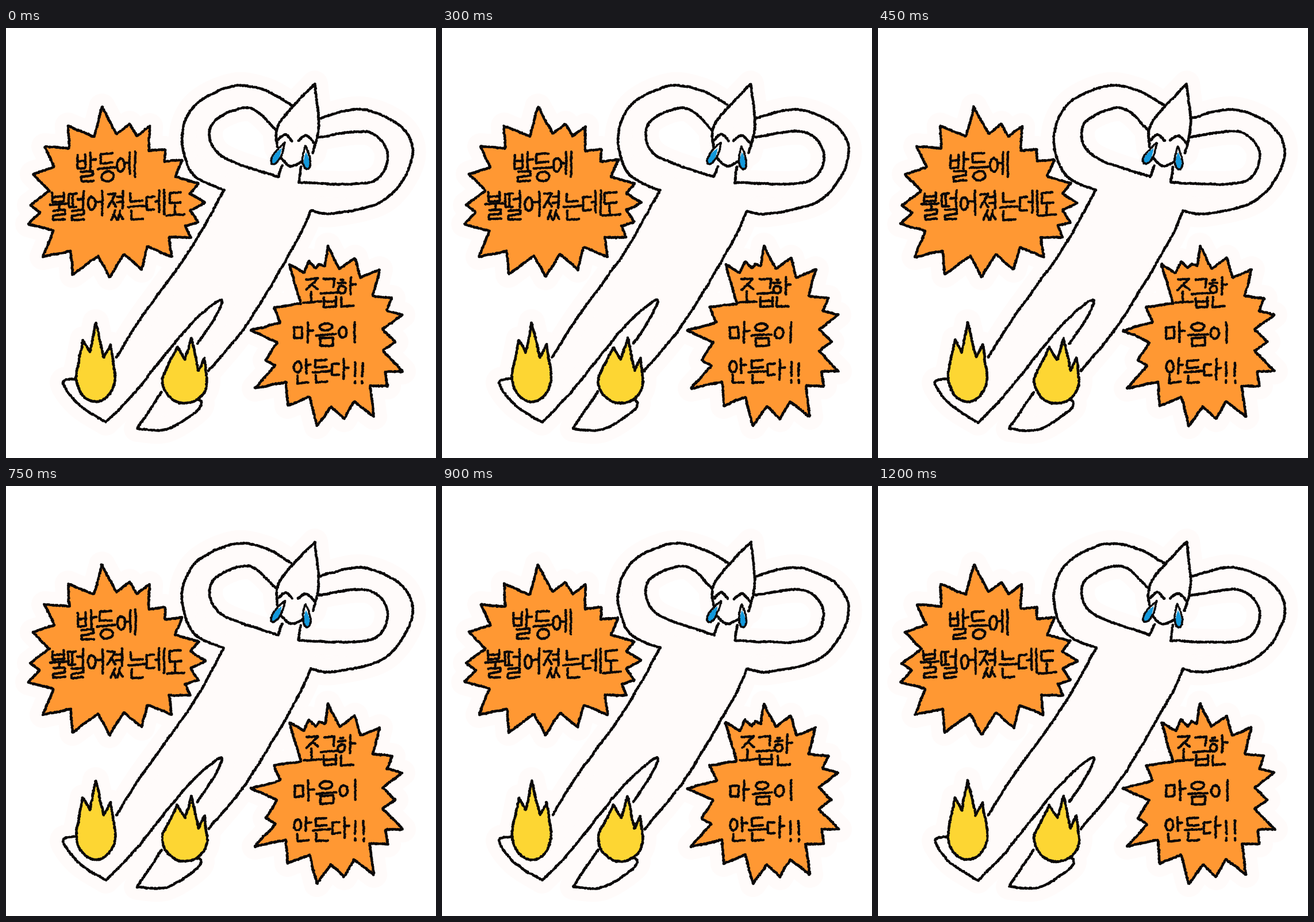
Write an HTML page with a canvas that moves like this. It is 748 px wide and 748 px high and loops after 1290 ms.

```html
<!DOCTYPE html>
<html lang="ko">
<head>
<meta charset="utf-8">
<style>
html, body { margin: 0; width: 100%; height: 100%; overflow: hidden; background: #fff; }
canvas { display: block; width: 748px; height: 748px; }
</style>
</head>
<body>
<canvas id="stage" width="748" height="748" role="img" aria-label="발등에 불 떨어졌는데도 조급한 마음이 안든다!!"></canvas>
<script>
const SIZE = 748, STEP = 150, LOOP = 1290, POSES = 9;
const INK = '#0b0909', HALO = '#fffbfa', ORANGE = '#ff9833', YELLOW = '#fdd633', BLUE = '#1399dc';

// Key points "x y x y" joined by splines; a bar marks a corner.
const figure = {
  armL: '497 134 452 109 395 101 330 133 306 190 325 254 379 282',
  sideL: '379 282 320 386 234 506 192 573',
  footL: '123 610 99 617 126 655 174 686 | 225 633 316 521 372 473 366 499 333 549',
  footR: '271 633 228 697 | 280 698 334 664 335 647 301 653',
  sideR: '530 319 503 376 421 512 352 597',
  armR: '545 157 620 142 690 174 706 230 660 298 570 323 530 318',
  loopL: '470 178 422 139 359 166 371 220 473 259 | 481 240',
  loopR: '544 190 630 181 664 220 634 268 509 269 | 513 242',
  head: '472 208 476 165 537 97 | 544 168 534 217',
  chin: '475 222 495 240 518 231',
  eyeL: '473 195 486 185 498 196',
  eyeR: '508 196 522 187 536 200'
};

// Only the spike tips; the notches between them follow from a rule.
const spikes = [
  '167 137 215 167 250 171 277 211 307 229 335 270 347 304 335 338 321 364 288 398 236 420 180 433 116 429 64 398 39 341 42 308 47 254 67 206 108 170',
  '560 379 607 400 650 420 672 470 689 499 677 546 690 597 664 623 640 676 588 680 541 692 490 657 433 627 452 578 426 526 466 486 493 411 527 406 545 410'
];

const rows = [
  { text: '발등에', x: 125, y: 217, pitch: 34, w: 32, h: 50 },
  { text: '불떨어졌는데도', x: 75, y: 285, pitch: 34, w: 31, h: 49 },
  { text: '조급한', x: 517, y: 435, pitch: 30, w: 31, h: 51 },
  { text: '마음이', x: 501, y: 513, pitch: 39, w: 34, h: 41 },
  { text: '안든다!!', x: 500, y: 577, pitch: 33, w: 30, h: 41 }
];

// Letter strokes as "xy" digits on a 0-9 grid; "o" is an oval below the given height.
const jamo = {
  ㄱ: '00 90 89', ㄴ: '00 09 99', ㄷ: '90 00 09 99', ㄸ: '40 00 09 49/90 50 59 99',
  ㄹ: '00 90 94 05 09 99', ㅁ: '00 90 99 09 00', ㅂ: '00 09 99 90/04 94', ㅇ: 'o0',
  ㅈ: '00 90 09/55 99', ㅆ: '30 09/24 49/70 59/74 99', ㅎ: '30 60/02 92/o4',
  ㅏ: '40 49/44 94', ㅓ: '04 64/60 69', ㅕ: '03 63/06 66/60 69', ㅔ: '04 44/40 48/90 99',
  ㅗ: '41 48/08 98', ㅜ: '01 91/51 59', ㅡ: '05 95', ㅣ: '60 69', '!': '50 56/58 59'
};
const FIRST = 'ㄱㄲㄴㄷㄸㄹㅁㅂㅃㅅㅆㅇㅈㅉㅊㅋㅌㅍㅎ';
const VOWEL = 'ㅏㅐㅑㅒㅓㅔㅕㅖㅗㅘㅙㅚㅛㅜㅝㅞㅟㅠㅡㅢㅣ';
const LAST = ' ㄱㄲㄳㄴㄵㄶㄷㄹㄺㄻㄼㄽㄾㄿㅀㅁㅂㅄㅅㅆㅇㅈㅊㅋㅌㅍㅎ';

function rng(seed) {
  let s = seed * 7919 + 13;
  return () => {
    s = (s + 0x6D2B79F5) | 0;
    let t = Math.imul(s ^ (s >>> 15), 1 | s);
    t = (t + Math.imul(t ^ (t >>> 7), 61 | t)) ^ t;
    return ((t ^ (t >>> 14)) >>> 0) / 4294967296;
  };
}

const mix = (a, b, t) => [a[0] + (b[0] - a[0]) * t, a[1] + (b[1] - a[1]) * t];
const gapOf = (a, b) => Math.hypot(b[0] - a[0], b[1] - a[1]);

function pairs(text) {
  const n = text.trim().split(/\s+/).map(Number), out = [];
  for (let i = 0; i < n.length; i += 2) out.push([n[i], n[i + 1]]);
  return out;
}

function spline(p) {
  const out = [p[0]];
  for (let i = 0; i < p.length - 1; i++) {
    const a = p[i - 1] || p[i], b = p[i], c = p[i + 1], d = p[i + 2] || c;
    for (let k = 1; k <= 16; k++) {
      const t = k / 16;
      out.push([0, 1].map(j => 0.5 * (2 * b[j] + (c[j] - a[j]) * t +
        (2 * a[j] - 5 * b[j] + 4 * c[j] - d[j]) * t * t +
        (3 * b[j] - a[j] - 3 * c[j] + d[j]) * t * t * t)));
    }
  }
  return out;
}

function curve(text) {
  let out = [];
  for (const part of text.split('|')) {
    const p = pairs(part);
    if (out.length) p.unshift(out[out.length - 1]);
    out = out.concat(spline(p));
  }
  return out;
}

function arc(cx, cy, rx, ry, from, to) {
  return Array.from({ length: 33 }, (_, i) => {
    const a = from + (to - from) * i / 32;
    return [cx + rx * Math.cos(a), cy + ry * Math.sin(a)];
  });
}

// The wider the gap between two tips, the deeper the notch.
function burst(text) {
  const tips = pairs(text), out = [];
  const centre = [0, 1].map(j => tips.reduce((s, p) => s + p[j], 0) / tips.length);
  tips.forEach((a, i) => {
    const b = tips[(i + 1) % tips.length], mid = mix(a, b, 0.5);
    out.push(a, mix(mid, centre, 0.57 * gapOf(a, b) / gapOf(mid, centre)));
  });
  return [...out, tips[0]];
}

// A round belly topped by three tongues.
function flame(cx, cy, rx, ry, tips) {
  const [a, b, c] = pairs(tips);
  const notch = (p, q) => [(p[0] + q[0]) / 2 + 1, Math.max(p[1], q[1]) + 22];
  const belly = arc(cx, cy, rx, ry, -0.2, Math.PI + 0.2);
  return [c, ...belly, ...spline([belly[32], mix(belly[32], a, 0.55), a]),
    notch(a, b), ...spline([notch(a, b), mix(notch(a, b), b, 0.5), b]),
    ...spline([b, mix(b, notch(b, c), 0.5), notch(b, c)]), c];
}

function drop(top, end, w) {
  const len = gapOf(top, end), ux = (end[0] - top[0]) / len, uy = (end[1] - top[1]) / len;
  return Array.from({ length: 33 }, (_, i) => {
    const a = i / 32 * Math.PI * 2;
    const along = (1 - Math.cos(a)) / 2 * len, side = w * Math.sin(a) * Math.sin(a / 2);
    return [top[0] + ux * along - uy * side, top[1] + uy * along + ux * side];
  });
}

// Splits a syllable and gives each part its box: x, y, width, height.
function layout(ch) {
  if (ch === '!') return [[ch, 0, 0.15, 1, 0.85]];
  const code = ch.charCodeAt(0) - 0xAC00;
  const a = FIRST[Math.floor(code / 588)], v = VOWEL[Math.floor(code % 588 / 28)], z = LAST[code % 28];
  const flat = 'ㅗㅜㅡ'.includes(v), closed = z !== ' ';
  const out = flat
    ? [[a, 0.16, 0.05, 0.64, closed ? 0.31 : 0.36], [v, 0, 0.43, 1, closed ? 0.2 : 0.46]]
    : [[a, 0.02, closed ? 0.08 : 0.2, 0.42, closed ? 0.46 : 0.46], [v, 0.5, 0, 0.5, closed ? 0.6 : 0.86]];
  if (closed) out.push([z, 0.2, 0.67, 0.66, 0.33]);
  return out;
}

function strokes(ch, x, y, w, h) {
  return layout(ch).flatMap(([key, bx, by, bw, bh]) => {
    const place = ([px, py]) => {
      const u = bx + bw * px / 9;
      return [x + w * u, y + h * (by + bh * py / 9) - 2 * u];
    };
    return jamo[key].split('/').map(s => {
      const pts = s[0] === 'o'
        ? arc(4.5, (9 + +s[1]) / 2, 4.5, (9 - s[1]) / 2, -1.7, -1.7 - Math.PI * 2)
        : s.split(' ').map(d => [+d[0], +d[1]]);
      return pts.map(place);
    });
  });
}

function letter(row) {
  let x = row.x;
  return [...row.text].map(ch => {
    const narrow = ch === '!', w = narrow ? 14 : row.w;
    const out = strokes(ch, x, row.y, w, row.h);
    x += narrow ? w : row.pitch;
    return out;
  });
}

// Evenly spaced points along a polyline.
function walk(pts, gap) {
  const out = [pts[0]];
  let left = gap;
  for (let i = 1; i < pts.length; i++) {
    const len = gapOf(pts[i - 1], pts[i]);
    let d = left;
    for (; d <= len; d += gap) out.push(mix(pts[i - 1], pts[i], d / len));
    left = d - len;
  }
  out.push(pts[pts.length - 1]);
  return out;
}

function trace(g, pts) {
  pts.forEach((p, i) => i ? g.lineTo(p[0], p[1]) : g.moveTo(p[0], p[1]));
  g.closePath();
}

function fill(g, pts, color) {
  g.beginPath();
  trace(g, pts);
  g.fillStyle = color;
  g.fill();
}

// Rough chalk line: a chain of dots with a slow drift and a fine grain.
function chalk(g, pts, rand, width = 5, dx = 0, dy = 0) {
  const drift = () => [(rand() - 0.5) * 1.4, (rand() - 0.5) * 1.4];
  let a = drift(), b = drift();
  g.beginPath();
  walk(pts, 1.2).forEach((p, i) => {
    const t = (i % 12) / 12;
    if (i && !t) { a = b; b = drift(); }
    const m = mix(a, b, t), r = width * (0.36 + rand() * 0.16);
    const x = p[0] + dx + m[0] + (rand() - 0.5) * 1.3;
    const y = p[1] + dy + m[1] + (rand() - 0.5) * 1.3;
    g.moveTo(x + r, y);
    g.arc(x, y, r, 0, Math.PI * 2);
  });
  g.fillStyle = INK;
  g.fill();
}

const lines = {};
for (const key in figure) lines[key] = curve(figure[key]);
const bursts = spikes.map(burst);
const flames = [
  flame(156, 606, 34, 44, '134 542 156 512 182 551'),
  flame(311, 613, 39, 40, '298 555 323 539 345 574')
];
const tears = [[[485, 200], [463, 236]], [[521, 206], [524, 246]]].map(([top, end]) => ({
  line: drop(top, end, 8.5),
  wet: drop(mix(top, end, 0.25), end, 7)
}));
const glyphs = rows.flatMap(letter);

function drawHalo(g) {
  const back = a => a.slice().reverse();
  const { armL, sideL, footL, footR, sideR, armR, head, loopL, loopR } = lines;
  const outer = [...armL, ...sideL, ...footL, ...footR, ...back(sideR), ...back(armR), ...back(head)];
  g.fillStyle = g.strokeStyle = HALO;
  g.lineWidth = 46;
  g.lineJoin = g.lineCap = 'round';
  g.beginPath();
  [outer, loopL, loopR].forEach(p => trace(g, p));
  g.fill('evenodd');
  g.stroke();
  for (const p of [...bursts, ...flames]) {
    g.beginPath();
    trace(g, p);
    g.fill();
    g.stroke();
  }
}

function drawPose(index) {
  const cv = document.createElement('canvas');
  cv.width = cv.height = SIZE;
  const g = cv.getContext('2d'), rand = rng(index + 1);
  g.fillStyle = '#fff';
  g.fillRect(0, 0, SIZE, SIZE);
  drawHalo(g);
  bursts.forEach(p => {
    fill(g, p, ORANGE);
    chalk(g, p, rand);
  });
  Object.values(lines).forEach(p => chalk(g, p, rand));
  flames.forEach(p => {
    fill(g, p, YELLOW);
    chalk(g, p, rand);
  });
  tears.forEach(t => {
    fill(g, t.line, HALO);
    fill(g, t.wet, BLUE);
    chalk(g, t.line, rand, 4);
  });
  glyphs.forEach(parts => {
    const dx = (rand() - 0.5) * 2.4, dy = (rand() - 0.5) * 1.4;
    parts.forEach(s => chalk(g, s, rand, 4.6, dx, dy));
  });
  return cv;
}

const poses = Array.from({ length: POSES }, (_, i) => drawPose(i));
const ctx = document.getElementById('stage').getContext('2d');
const start = performance.now();
let shown = -1;

function show(now) {
  const time = Math.max(0, now - start) % LOOP;
  const i = Math.min(POSES - 1, Math.floor(time / STEP));
  if (i !== shown) {
    ctx.drawImage(poses[i], 0, 0);
    shown = i;
  }
  requestAnimationFrame(show);
}
show(start);
</script>
</body>
</html>
```
